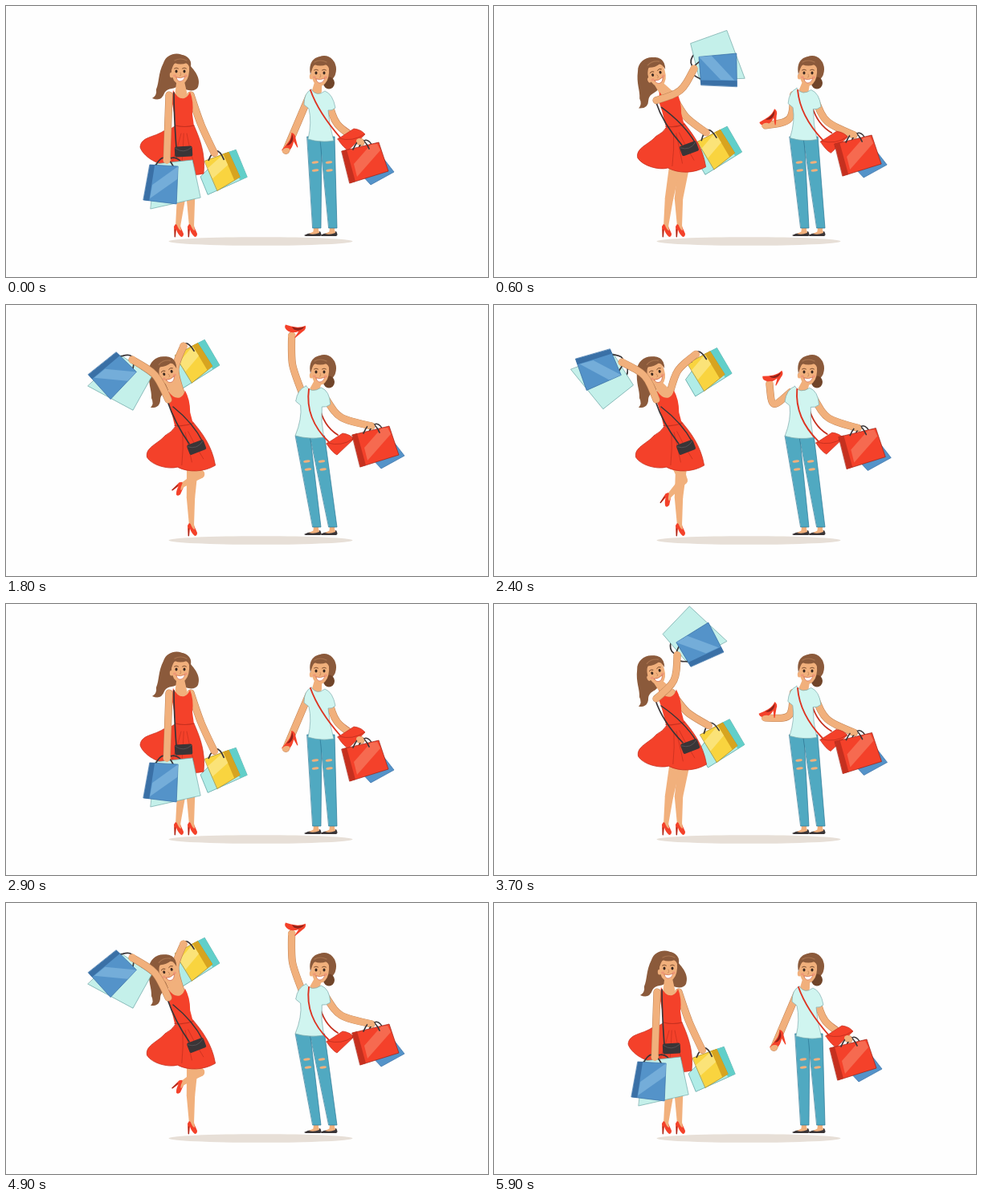
Animation of 600 by 338 pixels, one loop 6000 ms. Source, as an HTML page with a canvas:

```html
<!DOCTYPE html>
<html lang="en">
<head>
<meta charset="utf-8">
<title>Shopping friends</title>
<style>
html, body { margin: 0; height: 100%; overflow: hidden; background: #fefefe; }
canvas { display: block; width: 600px; height: 338px; }
</style>
</head>
<body>
<canvas id="stage" width="600" height="338"></canvas>
<script>
const ctx = document.getElementById('stage').getContext('2d');
const SKIN = '#f1b07c', SKIN_EDGE = '#c08355', HAIR = '#8b5a3b', HAIR_DARK = '#704429';
const RED = '#f4412a', RED_DARK = '#c5301f', BLACK = '#3a3537', CYAN = '#c4f0ea';
const BLUE = '#5493c9', BLUE_DARK = '#3a70a6', JEANS = '#50a9c1', JEANS_DARK = '#2c7895';
const LOOP = 3000, LEAD = 100;

// lean, kick, then for each arm: direction and reach of the hand, tilt of what it holds
const rest  = [0, 0,   92, 81, 0,       68, 78, 0,     113, 73, -24];
const mid   = [1, 0,   -64, 60, -124,   42, 62, -8,    138, 47, 0];
const reach = [1, 1,   -146, 65, -342,  -87, 58, -8,   228, 24, 28];
const high  = [1, 1,   -132, 67, -319,  -87, 59, -8,   260, 71, 40];
const keys = [[0, rest], [100, rest], [800, mid], [1200, reach], [1700, high],
  [2000, high], [2400, reach], [2700, mid], [3000, rest]];

// Smooth curve through the keys that never overshoots them
function slope(i, c) {
  if (i === 0 || i === keys.length - 1) return 0;
  const d = j => (keys[j + 1][1][c] - keys[j][1][c]) / (keys[j + 1][0] - keys[j][0]);
  const a = d(i - 1), b = d(i);
  return a * b <= 0 ? 0 : 2 * a * b / (a + b);
}
function poseAt(time) {
  const i = keys.findIndex((key, k) => time < keys[k + 1][0]);
  const [t0, a] = keys[i], [t1, b] = keys[i + 1], h = t1 - t0, u = (time - t0) / h;
  const ease = u * u * (3 - 2 * u);
  return a.map((v, c) => v + (b[c] - v) * ease
    + h * u * (1 - u) * ((1 - u) * slope(i, c) - u * slope(i + 1, c)));
}

const mix = (a, b, u) => a.map((v, i) => v + (b[i] - v) * u);

function shape(d, fill, edge, width = .7) {
  const p = new Path2D(d);
  if (fill) { ctx.fillStyle = fill; ctx.fill(p); }
  if (edge) { ctx.strokeStyle = edge; ctx.lineWidth = width; ctx.stroke(p); }
}
const line = (d, colour, width) => shape(d, null, colour, width);
function oval(x, y, rx, ry, fill, turn = 0) {
  ctx.beginPath();
  ctx.ellipse(x, y, rx, ry, turn, 0, 7);
  ctx.fillStyle = fill;
  ctx.fill();
}
function placed(x, y, degrees, draw) {
  ctx.save();
  ctx.translate(x, y);
  ctx.rotate(degrees * Math.PI / 180);
  draw();
  ctx.restore();
}
function taper(x, y, r, X, Y, R) {
  const a = Math.atan2(Y - y, X - x), q = Math.PI / 2;
  ctx.beginPath();
  ctx.arc(x, y, r, a + q, a - q);
  ctx.arc(X, Y, R, a - q, a + q);
  ctx.fillStyle = SKIN;
  ctx.fill();
}
function leg(hipX, [kx, ky, ax, ay]) {
  taper(hipX, 203, 7, kx, ky, 5.2);
  taper(kx, ky, 5.2, ax, ay, 3);
}

// The closer the hand is to the shoulder, the further the elbow is pushed aside
function arm([x, y], [direction, reach], full, bend) {
  const a = direction * Math.PI / 180, dx = Math.cos(a), dy = Math.sin(a);
  const side = bend(dy) * Math.sqrt(Math.max(0, full * full - reach * reach));
  return [x, y, x + dx * reach / 2 - dy * side, y + dy * reach / 2 + dx * side, x + dx * reach, y + dy * reach];
}
function drawArm([x, y, ex, ey, hx, hy]) {
  const d = `M${x} ${y}C${ex} ${ey} ${ex} ${ey} ${hx} ${hy}`;
  line(d, SKIN_EDGE, 9.2);
  line(d, SKIN, 8.2);
}

function head(x, y, turn) {
  placed(x, y, turn, () => {
    shape('M-11-8Q-12 8-5 13Q1 17 6 12Q12 6 11-9Q0-19-11-8Z', SKIN);
    oval(-11, 3, 2.2, 3.5, SKIN);
    shape('M-12 1Q-15-14-6-20Q4-25 11-17Q15-12 12-3Q11-9 8-12Q0-9-7-12Q-10-8-12 1Z', HAIR);
    line('M-7-15Q0-19 8-15', '#a9744f', 1.2);
    for (const s of [-5, 5]) {
      oval(s, -1.5, 1.5, 1.9, '#3b2920');
      line(`M${s - 2.5}-5q2.5-2 5 0`, HAIR_DARK, .9);
      oval(s * 1.4, 4, 2, 1.4, '#ee9878');
    }
    line('M0 0Q2 4-.5 4', SKIN_EDGE, .8);
    shape('M-5 6Q0 8 6 5Q4 11 0 11Q-4 11-5 6Z', '#fff', '#c9573f', .6);
  });
}

const handle = (x, width) => line(`M${x} 9q${width / 2}-23 ${width}-1`, BLACK, 1.7);
function blueBags() {
  handle(-6, 28);
  shape('M-14 5L32 0L42 47L-20 61Z', CYAN, '#72aaa9');
  handle(-15, 23);
  shape('M-21 6L14 8L12 55L-29 50Z', BLUE, BLUE_DARK);
  shape('M-21 6h6L-22 51L-29 50Z', BLUE_DARK);
  shape('M-18 31L14 8L13 24L-21 48Z', '#74add9');
}
function yellowBags() {
  shape('M-17 30L-8 52L41 30L27-4L10 2Z', '#b0ece7', '#519b9b');
  shape('M17-1L27-4L41 30L32 34Z', '#61cfc9');
  shape('M-12 10L18-1L32 30L4 47Z', '#f9d43f', '#a98520');
  shape('M11 1L18-1L32 30L25 34Z', '#d7a420');
  shape('M-8 19L11 2L17 15L-2 32Z', '#fbe378');
  handle(-7, 19);
}
function redBags() {
  shape('M20 10L41 37L12 53L0 40Z', BLUE, BLUE_DARK);
  handle(-4, 20);
  shape('M-24 11L22 0L34 36L-14 51Z', RED, '#992318');
  shape('M-24 11L-18 9L-7 49L-14 51Z', RED_DARK);
  shape('M-9 27L12 3L20 2L24 10L-5 43Z', '#f66a50');
  handle(-10, 20);
}
function pump(x, y, turn) {
  placed(x, y, turn, () => {
    shape('M-3-3L3 0L7 9Q7 13 4 13Q0 10-2 4L-3 13H-4.3L-5 0Z', RED);
    shape('M-2-4L3-2L4 5Q1 5-2-4Z', SKIN);
    line('M-3.7 4V13', '#8d2218', 1);
  });
}
function heldShoe() {
  shape('M-12 4Q-5 1 0-2Q5-5 8-11Q12-8 10-3L8 9H7L6 0Q2 7-4 8Q-11 9-12 4Z', RED);
  shape('M-4 1Q3-1 8-9Q8-3 4 0Q0 3-4 1Z', '#8f2219');
}

function dancer([lean, kick, ...hands]) {
  const blue = arm(mix([203, 111], [202, 118], lean), hands, 81, () => .24);
  const yellow = arm(mix([230, 111], [221 - 3 * kick, 110], lean), hands.slice(3), 79, dy => .22 * dy);
  const [hx, hy, turn] = mix([217, 83, 0], [202, 86, -20], lean);
  const waist = 222 + 3 * lean - 4 * kick, hip = 224 + 6 * lean - 2 * kick;

  placed(hx, hy, turn, () => {
    shape('M12-8C10-28-16-28-21-12C-28 2-26 12-30 21Q-29 29-35 32Q-24 37-20 26C-15 17-6 23-2 14Z', HAIR);
    ctx.scale(1 - lean, 1);
    shape('M8-14C18-2 26 6 22 18Q18 25 6 21Q0 8 8-14Z', HAIR);
  });

  placed(yellow[4], yellow[5], hands[5], yellowBags);
  drawArm(yellow);
  oval(yellow[4], yellow[5], 5, 3.8, SKIN, .4);

  const near = mix([218, 240, 214, 275], [242, 211, 219, 225], kick);
  leg(hip + 6 - 2 * kick, [230, 240, 231, 275]);
  leg(hip - 5 + 8 * kick, near);
  pump(231, 275, 0);
  pump(near[2], near[3], 48 * kick);

  taper(hx, hy + 9, 4.5, waist - 4 - 4 * lean, 112, 8);
  placed(waist, 149, -16 * lean, () => {
    shape('M-11 0H12C18 14 27 34 24 60C8 64-10 60-22 49C-34 49-52 38-55 27C-54 14-38 15-26 7Q-16 5-11 0Z', RED, RED_DARK);
    for (const fold of [-16, -3, 12]) line(`M${fold / 4} 10Q${fold / 2} 28 ${fold} 48`, RED_DARK);
  });
  placed(waist, 149, -7 * lean, () => {
    shape('M-14-44Q-8-32 0-34Q5-36 7-42Q12-30 10-14L12 1H-11Q-13-20-16-31Z', RED);
    line('M-11 0Q0 3 12 0', RED_DARK, 1.2);
  });

  const [px, py] = mix([221, 181], [244 - 7 * kick, 177], lean);
  const [sx, sy] = mix([209, 108], [201, 120], lean);
  line(`M${sx} ${sy}Q${sx + 9 * lean} ${sy + 27} ${px - 9} ${py - 4}`, BLACK, 1.7);
  if (lean > .1) line(`M${sx + 7} ${sy + 7}Q${waist + 12} 147 ${px + 8} ${py - 6}`, BLACK, 1.5);
  placed(px, py, -3 - 18 * lean, () => {
    shape('M-9-6H9Q11-6 11-3V5Q11 7 9 7H-9Q-11 7-11 5V-3Q-11-6-9-6Z', BLACK);
    line('M-10-4Q0 4 10-4', '#5c5557', .8);
  });

  head(hx, hy, turn);
  placed(blue[4], blue[5], hands[2], blueBags);
  drawArm(blue);
  oval(blue[4], blue[5], 4.6, 4.8, SKIN);
}

function friend([lean, kick, ...hands]) {
  const turn = (lean + kick) / 2;
  const raised = arm(mix([377, 113], [368, 108], turn), hands.slice(6), 73, () => -.42);
  const low = mix([401, 116, 409, 148, 442, 170], [399, 118, 414, 142, 455, 151], turn);
  const [px, py] = mix([430, 166], [416, 173], turn);
  const [, , , , sx, sy] = raised;

  oval(396, 79, 15, 17, HAIR);
  oval(402, 96, 7, 7.5, HAIR_DARK);
  line(`M${402 - 12 * turn} 126Q${px - 21} ${py - 22} ${px - 3} ${py - 11}`, RED_DARK, 1.7);
  drawArm(raised);
  placed(sx + 4, sy - 9, hands[8], heldShoe);
  oval(sx, sy, 5, 3, SKIN, -.3);

  const hip = 392 - 13.5 * turn;
  [-1, 1].forEach(side => {
    const ankle = 397 + side * 10, top = hip + side * (8 + turn);
    taper(ankle, 272, 3.5, ankle - 2, 283, 2.7);
    placed(ankle, 286, 0, () => {
      shape('M-16 0Q-9-4-3-2L4-5Q7 0 4 1H-14Z', BLACK);
      shape('M-10-2Q-4-5 2-7L3-3Q-4 0-10-2Z', SKIN);
    });
    shape(`M${top - 9} 163H${top + 9}L${ankle + 5} 277H${ankle - 5}Z`, JEANS, JEANS_DARK);
    for (const y of [195, 205]) oval(top + (ankle - top) * (y - 163) / 114, y, 4.3, 1.6, SKIN, -.1);
  });

  drawArm(low);
  taper(389, 94, 4.5, 387 - 3 * turn, 106, 6);
  ctx.save();
  ctx.transform(1 + .12 * turn, 0, -.145 * turn, 1, -37 * turn, -3 * turn);
  shape('M380 104Q387 114 397 106Q407 110 410 127Q406 131 401 130Q402 148 408 168Q392 171 376 166Q381 145 377 128L371 123Q371 108 380 104Z', '#d0f5f0', '#83aeb0');
  ctx.restore();
  head(391, 85, 0);

  const knot = 379 - 2 * turn;
  line(`M${knot} 105Q${knot + 10 - 15 * turn} ${133 + 9 * turn} ${px - 14} ${py - 2}`, '#dd3422', 1.9);
  placed(px, py, 0, () => {
    shape('M-17 0L3-13Q12-12 17-6L-4 14Q-10 11-17 0Z', RED, RED_DARK);
    line('M-16-1Q2 4 16-6', RED_DARK, .9);
  });
  placed(low[4], low[5], 0, redBags);
  oval(low[4] - 1, low[5] - 1, 5.2, 3.7, SKIN, .4);
}

function frame() {
  const pose = poseAt((performance.now() - begun + LEAD) % LOOP);
  ctx.fillStyle = '#fefefe';
  ctx.fillRect(0, 0, 600, 338);
  oval(317, 293.5, 114.5, 5.3, '#e7dfd7');
  dancer(pose);
  friend(pose);
  requestAnimationFrame(frame);
}
ctx.lineCap = ctx.lineJoin = 'round';
const begun = performance.now();
frame();
</script>
</body>
</html>
```
